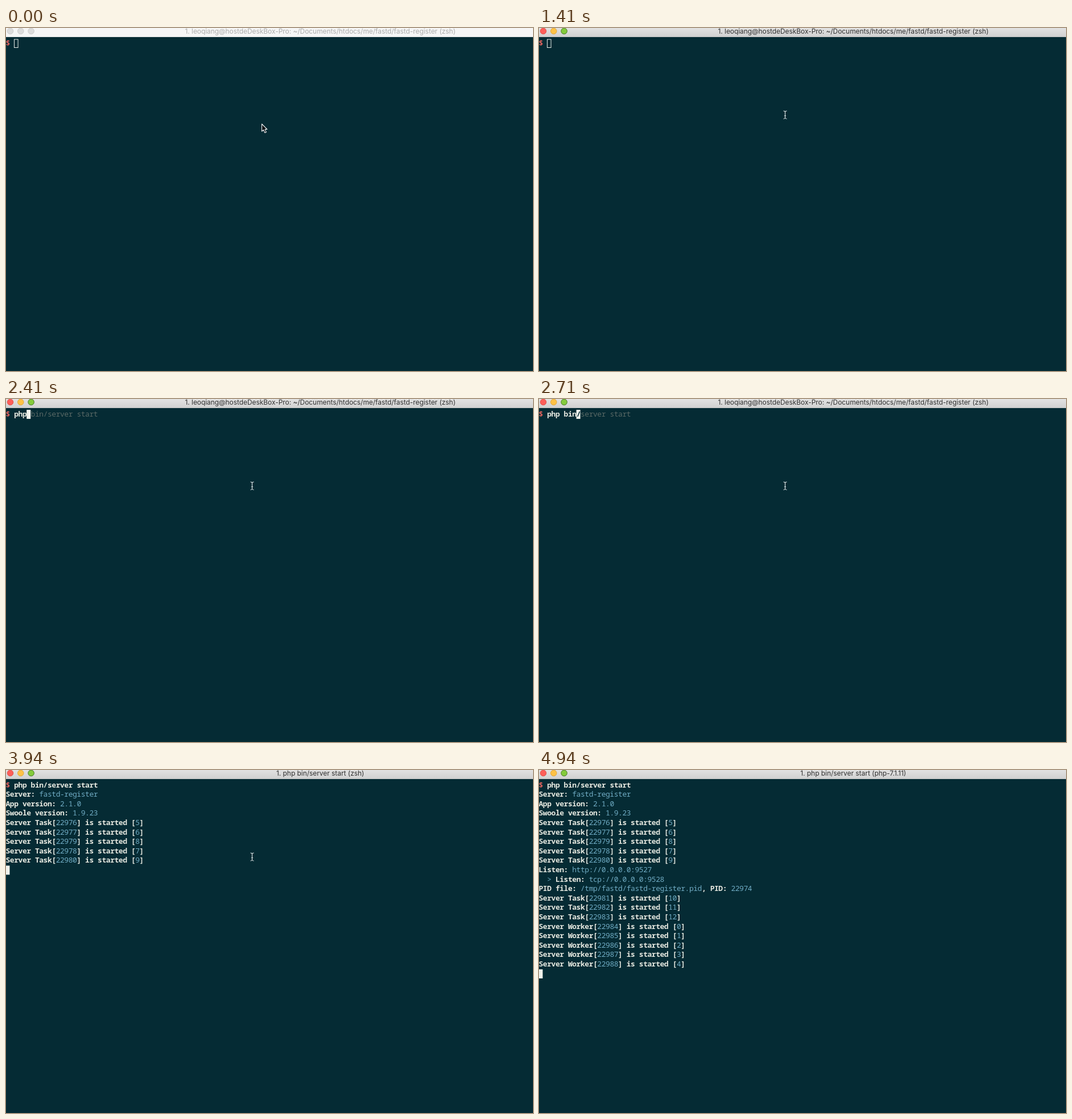
These frames come from a looping animation (926 by 604 pixels, 6.24 s). An HTML page:

```html
<!DOCTYPE html>
<html lang="en">
<head>
<meta charset="utf-8">
<title>Terminal</title>
<style>
html, body { margin: 0; width: 100%; height: 100%; overflow: hidden; background: #052b34; }
svg { display: block; width: 926px; height: 604px; }
.mono { font: 600 13px "Noto Sans Mono", monospace; letter-spacing: -0.455px; white-space: pre; fill: #e6e8e0; }
.title { font: 11.9px Inter, sans-serif; text-anchor: middle; }
.blue { fill: #70acc4; font-weight: 500; }
.hint { fill: #5a6966; font-weight: 500; }
.under { fill: #052b34; }
.prompt { fill: #e8645f; font-weight: 700; }
</style>
</head>
<body>
<svg viewBox="0 0 926 604">
  <defs>
    <linearGradient id="active" x2="0" y2="1">
      <stop offset="0" stop-color="#e2e2e2"/>
      <stop offset="1" stop-color="#d0d0d0"/>
    </linearGradient>
  </defs>
  <rect width="926" height="604" fill="#052b34"/>
  <rect id="bar" width="926" height="16"/>
  <rect id="edge" y="15" width="926" height="1"/>
  <g id="lights"></g>
  <text id="title" class="title" x="552.2" y="10"></text>
  <rect id="cursor"/>
  <g id="rows"></g>
  <path id="arrow" d="M0 0V13L3 10.3L5.3 15.5L7.8 14.4L5.6 9.4H9.3Z" fill="#071015" stroke="#f4f4f4" stroke-width="1.1" stroke-linejoin="round"/>
  <path id="beam" d="M-3 -7Q-0.4 -7 0 -5Q0.4 -7 3 -7M0 -5V5M-3 7Q-0.4 7 0 5Q0.4 7 3 7M-1.6 1.5H1.6" fill="none" stroke="#d5dcdd" stroke-width="1.2"/>
</svg>
<script>
const LOOP = 6240, CELL = 7.345, LINE = 16.6;
const NS = 'http://www.w3.org/2000/svg';
const $ = id => document.getElementById(id);
const command = 'php bin/server start';

function set(el, attrs) {
  for (const key in attrs) el.setAttribute(key, attrs[key]);
  return el;
}
const add = (parent, tag, attrs) => set(parent.appendChild(document.createElementNS(NS, tag)), attrs);

// Latest entry whose start time has passed
const at = (steps, t) => steps.reduce((last, step) => t >= step[0] ? step : last);

const started = (kind, pid, id) => `Server ${kind}[{${pid}}] is started [{${id}}]`;
const output = [
  'Server: {fastd-register}',
  'App version: {2.1.0}',
  'Swoole version: {1.9.23}',
  ...[[22976, 5], [22977, 6], [22979, 8], [22978, 7], [22980, 9]].map(p => started('Task', ...p)),
  'Listen: {http://0.0.0.0:9527}',
  '  {>} Listen: {tcp://0.0.0.0:9528}',
  'PID file: {/tmp/fastd/fastd-register.pid}, PID: {22974}',
  ...[0, 1, 2].map(i => started('Task', 22981 + i, 10 + i)),
  ...[0, 1, 2, 3, 4].map(i => started('Worker', 22984 + i, i))
];

const titles = [
  [0, '1. leoqiang@hostdeDeskBox-Pro: ~/Documents/htdocs/me/fastd/fastd-register (zsh)'],
  [3940, '1. php bin/server start (zsh)'],
  [4710, '1. php bin/server start (php-7.1.11)']
];
const typed = [
  [0, 0], [2060, 1], [2180, 2], [2410, 3], [2470, 4], [2530, 5], [2590, 6],
  [2710, 7], [3180, 8], [3290, 9], [3350, 15], [3650, 20]
];
const printed = [[0, 0], [3940, 8], [4060, output.length]];
const pointer = [
  [0, 449.5, 169], [1180, 441.5, 157.5], [1240, 433, 150.5], [1410, 432.5, 153],
  [4710, 455, 158], [4770, 560, 180], [4830, 730, 214], [4890, 919, 245], [4940, -50, -50]
];

const lights = [['#fc5e59', '#dd4b46'], ['#fdc246', '#dba238'], ['#84cb3c', '#3f7028']].map(([fill, stroke], i) => ({
  fill, stroke, el: add($('lights'), 'circle', { cx: 7.5 + i * 18.3, cy: 5.4, r: 5.3, 'stroke-width': 0.9 })
}));

function addRow(i) {
  return add($('rows'), 'text', { class: 'mono', x: -0.5, y: 30.6 + i * LINE });
}
function span(row, text, cls = '') {
  add(row, 'tspan', { class: cls }).textContent = text;
}

const input = addRow(0);
span(input, '$ ', 'prompt');
['', 'under', 'hint'].forEach(cls => span(input, '', cls));
const parts = [...input.children].slice(1);

const rows = output.map((line, i) => {
  const row = addRow(i + 1);
  line.split(/[{}]/).forEach((text, k) => span(row, text, k % 2 ? 'blue' : ''));
  return row;
});

function drawWindow(t) {
  const active = t >= 1410;
  set($('bar'), { fill: active ? 'url(#active)' : '#f6f6f6' });
  set($('edge'), { fill: active ? '#c2c4c4' : '#e4e6e6' });
  set($('title'), { fill: active ? '#303030' : '#acacac' });
  $('title').textContent = at(titles, t)[1];
  for (const { el, fill, stroke } of lights) {
    set(el, { fill: active ? fill : '#dddddd', stroke: active ? stroke : '#c9c9c9' });
  }
}

function drawText(t) {
  const n = at(typed, t)[1], shown = at(printed, t)[1];
  const hint = n > 2 ? command.slice(n) : '';
  parts[0].textContent = command.slice(0, n);
  parts[1].textContent = hint.slice(0, 1);
  parts[2].textContent = hint.slice(1);
  rows.forEach((row, i) => set(row, { visibility: i < shown ? 'visible' : 'hidden' }));

  const running = t >= 3880;
  const x = running ? -0.5 : (n + 2) * CELL - 0.5;
  const y = 19 + (running ? shown + 1 : 0) * LINE;
  set($('cursor'), t < 1530
    ? { x: x + 0.3, y: 20, width: 6.6, height: 14.5, fill: 'none', stroke: '#e8ebe6' }
    : { x, y, width: 7, height: 16, fill: '#f1f2ec', stroke: 'none' });
}

function drawPointer(t) {
  const [, x, y] = at(pointer, t);
  const beam = t >= 1410;
  set($('beam'), { transform: `translate(${x} ${y})`, visibility: beam ? 'visible' : 'hidden' });
  set($('arrow'), { transform: `translate(${x} ${y})`, visibility: beam ? 'hidden' : 'visible' });
}

function draw(t) {
  drawWindow(t);
  drawText(t);
  drawPointer(t);
}

const begin = performance.now();
function tick() {
  draw((performance.now() - begin) % LOOP);
  requestAnimationFrame(tick);
}
tick();
</script>
</body>
</html>
```
